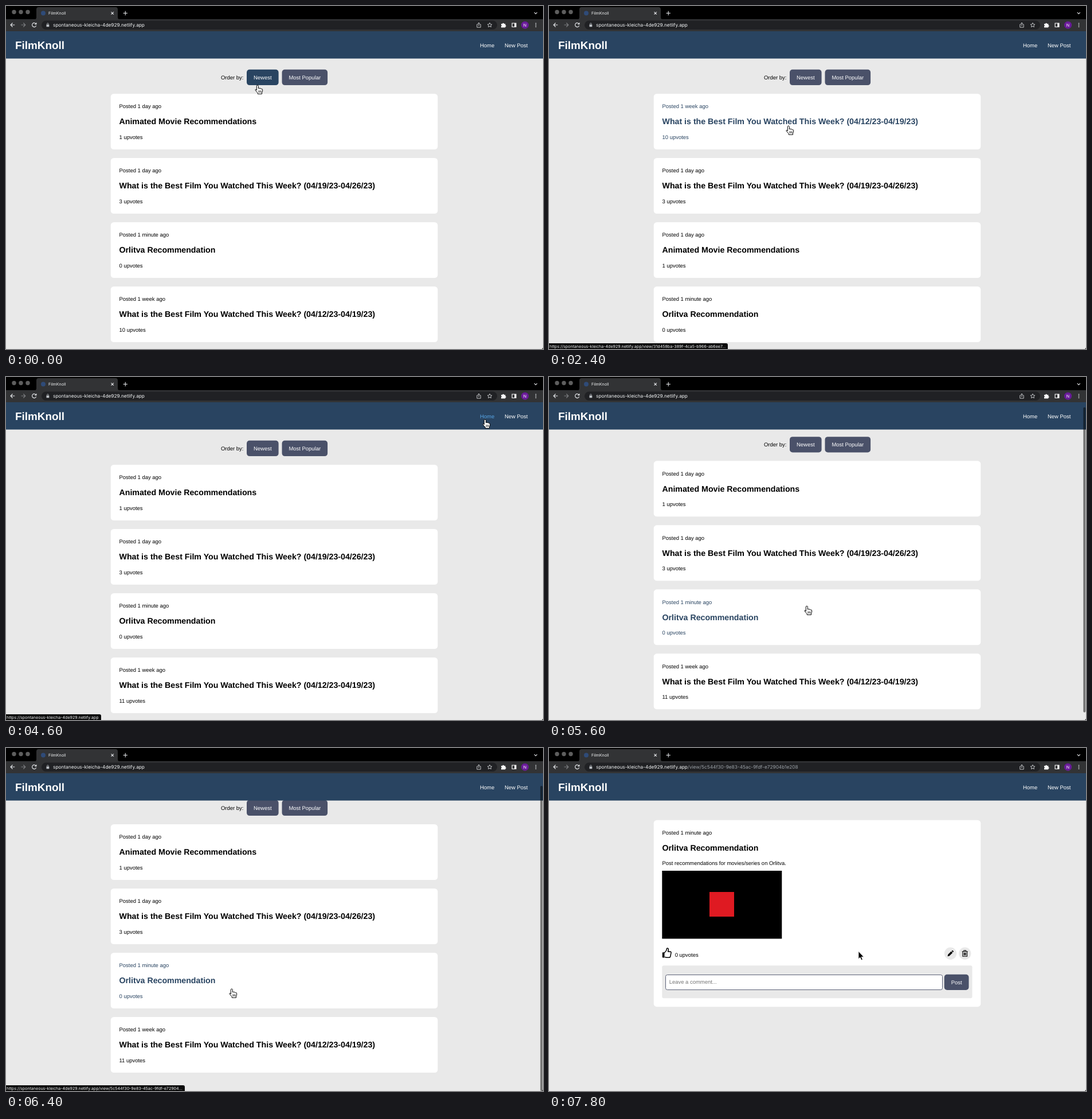
Write an HTML page that moves like this. It is 937 px wide and 598 px high and loops after 8 s.

```html
<!DOCTYPE html>
<html lang="en">
<head>
<meta charset="utf-8">
<title>FilmKnoll</title>
<style>
  html, body { margin: 0; width: 100%; height: 100%; overflow: hidden; background: #e9e9e9; }
  svg { display: block; width: 937px; height: 598px; }
  text { font: 9.46px "Liberation Sans", Arial, sans-serif; white-space: pre; text-rendering: geometricPrecision; }
  .h2 { font-size: 14.2px; font-weight: 700; }
  .logo { font-size: 18.9px; font-weight: 700; fill: #fff; }
  .ui { font-family: Inter, Roboto, sans-serif; fill: #f1f3f4; }
  .tab { font-size: 7.08px; }
  .url { font-size: 8.31px; }
  .line { fill: none; stroke: #e8eaed; stroke-width: 1.1; }
  .mid { text-anchor: middle; fill: #fff; }
</style>
</head>
<body>
<svg viewBox="0 0 937 598">
  <rect width="937" height="598" fill="#e9e9e9"/>
  <g id="page"></g>

  <rect width="937" height="24" fill="#000"/>
  <g fill="#5e5e5e"><circle cx="14" cy="10.5" r="3.7"/><circle cx="26" cy="10.5" r="3.7"/><circle cx="38" cy="10.5" r="3.7"/></g>
  <path d="M49 23.5q4 0 4-4V6q0-4 4-4H191q4 0 4 4V19.5q0 4 4 4z" fill="#323335"/>
  <circle cx="65" cy="12.5" r="4" fill="#2f4b78"/>
  <text class="ui tab" x="74" y="15">FilmKnoll</text>
  <path class="line" d="M183.500 10.300l4.400 4.400m0-4.400l-4.400 4.400M204.500 12.500h7.400m-3.700-3.700v7.400M921.800 11.200l2.500 2.500 2.500-2.500"/>

  <rect y="23" width="937" height="21" fill="#323335"/>
  <rect x="62" y="25.5" width="795" height="15.5" rx="7.7" fill="#202124"/>
  <path class="line" d="M15.300 33H8m3.500-3.500L8 33l3.500 3.500"/>
  <path class="line" d="M26.500 33h7.300m-3.500-3.500l3.500 3.500-3.500 3.500" style="stroke:#7d7f82"/>
  <path class="line" d="M52.300 31.200A3.600 3.600 0 1 0 52.600 34.200M52.900 28.900v2.800h-2.800"/>
  <rect x="70.5" y="32.3" width="4.8" height="4" rx=".6" fill="#bdc1c6"/>
  <path class="line" d="M71.500 32.500v-1.200a1.400 1.400 0 0 1 2.800 0v1.200" style="stroke:#bdc1c6;stroke-width:.8"/>
  <text class="ui url" x="82" y="36.2">spontaneous-kleicha-4de929.netlify.app<tspan id="path" fill="#9aa0a6"></tspan></text>
  <g class="line" style="stroke-width:.8">
    <path d="M823.500 32h-1.700v5.200h6.400V32h-1.700M825 34.800v-5.800m-1.700 1.700l1.700-1.700 1.700 1.700"/>
    <path d="M844 29.300l1.150 2.500 2.700.3-2 1.850.55 2.700-2.400-1.350-2.400 1.350.55-2.700-2-1.850 2.700-.3z"/>
  </g>
  <path d="M864 31h2.300a1.300 1.300 0 1 1 2.600 0h2.400v2.400a1.300 1.300 0 1 1 0 2.600v1.500h-7.300v-2.300a1.300 1.300 0 0 0 0-2.400z" fill="#fff"/>
  <path d="M882.500 29.500h8v7.500h-8zm1.100 1.100v5.300h3.600v-5.300z" fill="#fff" fill-rule="evenodd"/>
  <circle cx="905.5" cy="33.2" r="6.5" fill="#6a1b9a"/>
  <text class="ui mid tab" x="905.5" y="35.8">N</text>
  <g fill="#e8eaed"><circle cx="924.5" cy="30.3" r=".9"/><circle cx="924.5" cy="33.2" r=".9"/><circle cx="924.5" cy="36.1" r=".9"/></g>

  <rect y="44" width="937" height="47.6" fill="#294461"/>
  <text class="logo" x="16" y="74.8">FilmKnoll</text>
  <text id="home" x="827" y="71.5">Home</text>
  <text x="870" y="71.5" fill="#fff">New Post</text>
  <path d="M937 595.500v2.500h-2.500q2 0 2.500-2.500" fill="#000"/>
  <g id="top"></g>
</svg>
<script>
const LOOP = 8000, TICK = 200;
const NAVY = '#294461', SLATE = '#4a5169', PALE = '#e9e9e9';
const $ = id => document.getElementById(id);

const week = { age: '1 week', title: 'What is the Best Film You Watched This Week? (04/12/23-04/19/23)', votes: 10,
  body: 'Post a review of the best film you watched this week. It can be any new or old release that you want to talk about.',
  path: '/view/31d458ba-389f-4ca5-b966-ab6ee78b93a0',
  comments: ['- Saul Brock: Chapter 6 - Love the action, cinematography, music, and satisfying ending...',
    '- Georgette: Nightfall - Better than Brambling I would say. Plenty of jump scares but no so many that it is annoying.'] };
const lastWeek = { age: '1 day', title: 'What is the Best Film You Watched This Week? (04/19/23-04/26/23)', votes: 3 };
const cartoon = { age: '1 day', title: 'Animated Movie Recommendations', votes: 1 };
const stream = { age: '1 minute', title: 'Orlitva Recommendation', votes: 0, image: true, comments: [],
  body: 'Post recommendations for movies/series on Orlitva.',
  path: '/view/5c544f30-9e83-45ac-9fdf-e72904b1e208' };
const newest = [cartoon, lastWeek, stream, week];
const popular = [week, lastWeek, cartoon, stream];

// time, x, y, 1 = hand or 0 = arrow
const moves = [
  [0, 439, 138, 1], [200, 446, 136, 1], [400, 462, 133, 1], [600, 484, 131, 1], [1000, 514, 129, 1], [1200, 520, 129, 1],
  [1600, 520, 129, 1], [1800, 461, 184.5, 0], [2000, 428, 205, 1], [2200, 418, 209, 1], [2400, 418, 209, 1],
  [2600, 414, 211, 0], [2800, 345, 226, 0], [3000, 250, 236, 0], [3200, 213, 231.5, 1], [3600, 213, 231.5, 1],
  [3800, 290, 212, 0], [4000, 590, 142, 0], [4200, 822, 78, 1], [4400, 836, 74, 1], [4600, 836, 74, 1],
  [4800, 800, 118, 0], [5000, 700, 210, 1], [5200, 570, 310, 1], [5400, 470, 390, 1], [6000, 410, 418, 1],
  [6200, 394, 420, 1], [6400, 394, 420, 1], [6600, 398, 410, 0], [6800, 403, 391, 0], [7000, 403, 391, 0], [7800, 540, 354.5, 0]];

function cursorAt(t) {
  const i = moves.findLastIndex(m => m[0] <= t);
  const a = moves[i], b = moves[i + 1] || a;
  const k = a === b ? 0 : (t - a[0]) / (b[0] - a[0]);
  return { x: a[1] + (b[1] - a[1]) * k, y: a[2] + (b[2] - a[2]) * k, hand: a[3] };
}

const text = (x, y, s, fill = '#000', cls = '') => `<text x="${x}" y="${y}" fill="${fill}" class="${cls}">${s}</text>`;
const box = (x, y, w, h, r, fill, more = '') => `<rect x="${x}" y="${y}" width="${w}" height="${h}" rx="${r}" fill="${fill}" ${more}/>`;
const disc = (x, y, r, fill) => `<circle cx="${x}" cy="${y}" r="${r}" fill="${fill}"/>`;
const at = (x, y, s) => `<g transform="translate(${x} ${y})">${s}</g>`;
const button = (x, y, w, label, fill = SLATE) =>
  box(x, y, w, 27.3, 5, fill) + text(x + w / 2, y + 17, label, '#fff', 'mid');

const hand = '<path d="M-1.7 9V1.6Q-1.7 0-.2 0T1.4 1.6V5.8Q2.6 4.7 4 5.8 5.3 5.2 6.4 6.5 8.7 6.2 8.7 8.6 8.7 11.4 7.5 12.8V15.3H.2V13.5Q-2.5 10.8-4 8.6-4.2 6.4-1.7 8.4Z" fill="#fff" stroke="#000" stroke-width="1"/><path d="M2 9.3v3.7M4 9.3v3.7M6 9.3v3.7" stroke="#000" stroke-width=".8"/>';
const arrow = '<path d="M0 0V13.2L2.9 10.5 5.1 15.3 7.2 14.4 5.1 9.7H9.2Z" fill="#000" stroke="#fff" stroke-width=".7"/>';
const thumb = c => `<path d="M.5 9H4.200V17.500H1.500Q.5 17.500.5 16.500Z" fill="${c}"/><path d="M.8 9H4.300L7.400 5.200 8.200 1.900Q9.100.6 10.500 1.500 11.900 3.200 10.300 7H14.200Q16.200 7.300 15.700 9.200L14.600 15.300Q14.100 17.300 12.300 17.400H7.600L4.500 16.500" fill="none" stroke="${c}" stroke-width="1.500" stroke-linejoin="round"/>`;
const pencil = '<path d="M-5 5L-4.3 1.900 1.300-3.700 3.700-1.300-1.900 4.300ZM2-4.400L3.100-5.300Q3.700-5.600 4.300-5L5.100-4.200Q5.600-3.600 5.200-3L4.400-2Z"/>';
const bin = '<path d="M-5-3.500H5M-1.800-3.700V-5.200H1.800V-3.700M-3.800-3.500V5H3.800V-3.500M-1.500-1.500V3.300M0-1.500V3.300M1.500-1.500V3.300" fill="none" stroke="#000" stroke-width="1.1"/>';

function postHead(p, y, c) {
  return text(197.5, y, `Posted ${p.age} ago`, c) + text(197.5, y + 28, p.title, c, 'h2');
}

function listPage(posts, votes, cur, scroll) {
  const over = (x, y, w, h) => cur.hand && cur.x >= x && cur.x <= x + w && cur.y + scroll >= y && cur.y + scroll <= y + h;
  const order = (x, w, s) => button(x, 110.8, w, s, over(x, 110.8, w, 27.3) ? NAVY : SLATE);
  const cards = posts.map((p, i) => {
    const y = 153 + 112 * i, c = over(183, y, 570, 97) ? NAVY : '#000';
    return box(182.7, y, 570.6, 97, 5.5, '#fff') + postHead(p, y + 25.2, c)
      + text(197.5, y + 78.5, `${p === week ? votes : p.votes} upvotes`, c);
  });
  return at(0, -scroll, text(375, 128, 'Order by:') + order(420, 55.6, 'Newest')
    + order(481.5, 79.6, 'Most Popular') + cards.join(''));
}

function viewPage(p, votes, t, loading, picture, liked) {
  const d = p.image ? 128.2 : 0, top = 251 + d, n = p.comments.length;
  const gap = loading ? 49 : n ? 68 : 15.3;
  const h = loading ? 91 : n ? 110 : 57;
  let s = box(182.7, 125.7, 570.6, top + h + 15 - 125.7, 5.5, '#fff') + postHead(p, 151, '#000') + text(197.5, 204.3, p.body);
  if (picture) s += box(197.3, 214, 209, 118.5, 0, '#000') + box(280, 251, 43, 43, 0, '#df1a22');
  s += at(197.3, 219.7 + d, thumb(liked ? NAVY : '#000')) + text(219.7, 236.2 + d, `${votes} upvotes`)
    + disc(700.5, 230 + d, 10.7, PALE) + at(700.5, 230 + d, pencil)
    + disc(725.7, 230 + d, 10.7, PALE) + at(725.7, 230 + d, bin)
    + box(197.3, top, 541.2, h, 3, PALE);
  if (loading) {
    const lit = (t / TICK + 2) % 3;
    [212, 230, 247.7].forEach((x, i) => s += disc(x, top + 24, i === lit ? 6 : 5.5, i === lit ? '#424f6c' : '#6b7889'));
  } else {
    p.comments.forEach((c, i) => s += text(203.5, top + 19.8 + 26.4 * i, c) + box(203.5, top + 28.6 + 26.4 * i, 529, .9, 0, '#9b9ea8'));
  }
  const field = Math.round(top + gap);
  return s + box(203.5, field + .5, 483, 26, 3, '#fff', `stroke="${SLATE}" stroke-width=".9"`)
    + text(209.7, field + 16.2, 'Leave a comment...', '#757575') + button(689.7, field - .3, 42.8, 'Post');
}

function status(path) {
  const w = path ? 312 : 166;
  const tail = path ? path.slice(0, 36) + '…' : '';
  return box(-4, 588, w + 4, 14, 3, '#0c0c0c') + text(1, 596, 'https://spontaneous-kleicha-4de929.netlify.app' + tail, '#fff', 'ui tab');
}

function draw(t) {
  const cur = cursorAt(t);
  const post = t >= 6600 ? stream : t >= 2600 && t < 4400 ? week : null;
  const votes = t >= 3600 ? 11 : 10;
  const scroll = Math.max(0, Math.min(20, (t - 5400) / 30));
  const scrolling = t >= 5600 && t < 6600;
  const loading = t < 2800 || (t >= 6600 && t < 7000);

  $('page').innerHTML = post
    ? viewPage(post, post === week ? votes : post.votes, t, loading, post.image && t >= 7200, post === week && t >= 3200)
    : listPage(t >= 1400 && t < 2600 ? popular : newest, votes, cur, scroll);
  $('path').textContent = post ? post.path : '';
  $('home').setAttribute('fill', cur.hand && cur.x > 815 && cur.y < 92 ? '#57a5e6' : '#fff');

  let s = '';
  if (t >= 2200 && t < 2600) s += status(week.path);
  if (t >= 4400 && t < 4800) s += status('');
  if (t === 6400) s += status(stream.path);
  if (scrolling) s += box(932.3, 46 + scroll, 4, 532, 2, '#000', 'opacity=".5"');
  $('top').innerHTML = s + at(cur.x, cur.y, cur.hand ? hand : arrow);
}

let shown = -1;
const start = performance.now();
function frame() {
  const t = Math.floor((performance.now() - start) % LOOP / TICK) * TICK;
  if (t !== shown) draw(shown = t);
  requestAnimationFrame(frame);
}
frame();
</script>
</body>
</html>
```
